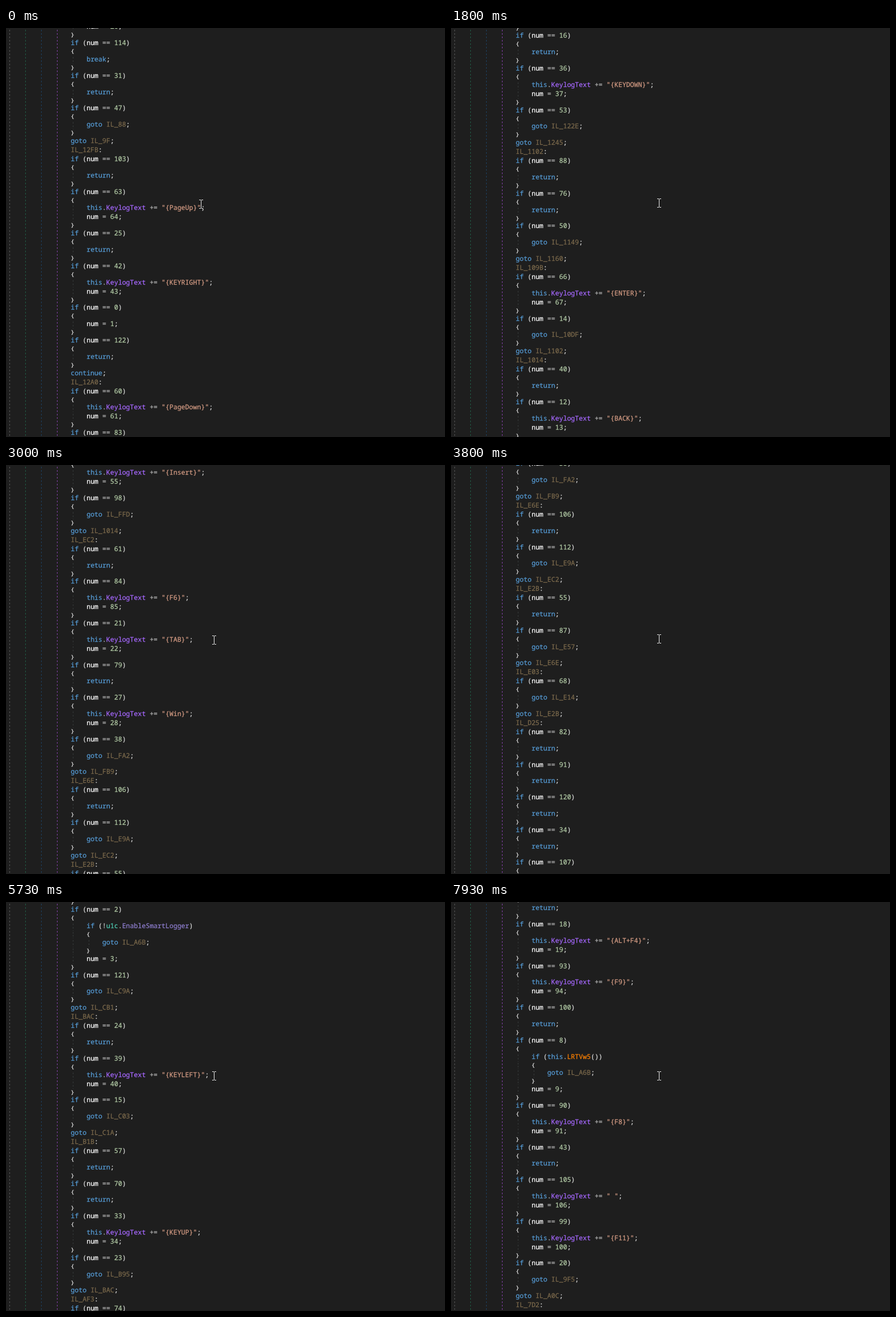
Animation of 775 by 722 pixels, one loop 8 s. Source, as an HTML page:

```html
<!DOCTYPE html>
<html lang="en">
<head>
<meta charset="utf-8">
<title>Scrolling code</title>
<style>
  html, body { margin: 0; width: 100%; height: 100%; overflow: hidden; background: #1e1e1e; }
  #stage { position: relative; width: 775px; height: 722px; overflow: hidden; background: #1e1e1e; }
  #doc {
    position: absolute; left: 114.3px; top: 0;
    font: 11.61px/16px "Noto Sans Mono", "DejaVu Sans Mono", monospace;
    text-rendering: geometricPrecision; white-space: pre; color: #dcdcdc;
    -webkit-text-stroke: .25px currentColor;
  }
  #doc div { position: absolute; left: 0; height: 16px; }
  #doc .brace { transform: scaleY(.8); transform-origin: 0 0; }
  .guide {
    position: absolute; width: 1px; height: 100%;
    background: repeating-linear-gradient(transparent 0 3px, var(--c, #363a3a) 3px 6px);
  }
  .key { color: #569cd6; }
  .str { color: #d69d85; }
  .num { color: #b5cea8; }
  .label { color: #7c6a4c; }
  .field { color: #a668ff; }
  .prop { color: #8f7fd0; }
  .type { color: #4ec9b0; }
  .method { color: #ff8000; }
  .local { color: #fff; }
  .param { color: #fff; font-weight: bold; -webkit-text-stroke: 0; }
  .op { color: #b4b4b4; }
  #cursor { position: absolute; left: 0; top: 0; }
</style>
</head>
<body>
<div id="stage">
  <i class="guide" style="left:6px;--c:#555"></i>
  <i class="guide" style="left:34px;--c:#1f5c45"></i>
  <i class="guide" style="left:62px;--c:#1d4062"></i>
  <i class="guide" style="left:90px;--c:#8440a8"></i>
  <div id="doc"></div>
  <svg id="cursor" width="7" height="16" shape-rendering="crispEdges">
    <path d="M0 0h3v1h1v-1h3v1h-3v14h3v1h-3v-1h-1v1h-3v-1h3v-14h-3z" fill="#f0f0f0"/>
  </svg>
</div>
<script>
const CHAR = 6.966, VIEW_TOP = -38.5, LOOP = 8000, FPS = 15;

// 31: return   47>88: goto   63+X: log a key   0=: next state   *: custom body
const program = `19+F12 114b 31 47>88 >9F
:12FB 103 63+PageUp 25 42+KEYRIGHT 0= 122 c
:12A0 60+PageDown 83>12E4 >12FB
:1245 72+F2 86>1289 >12A0
:1160 110* 30+CAPSLOCK 16 36+KEYDOWN 53>122E >1245
:1102 88 76 50>1149 >1160
:109B 66+ENTER 14>10DF >1102
:1014 40 12+BACK 102>1084 >109B
:FB9 54+Insert 98>FFD >1014
:EC2 61 84+F6 21+TAB 79 27+Win 38>FA2 >FB9
:E6E 106 112>E9A >EC2
:E2B 55 87>E57 >E6E
:E03 68>E14 >E2B
:D25 82 91 120 34 107>DA2 >E03
:CB1 113* 17>D02 >D25
:C1A 51+HOME 2* 121>C9A >CB1
:BAC 24 39+KEYLEFT 15>C03 >C1A
:B1B 57 70 33+KEYUP 23>B95 >BAC
:AF3 74>B04 >B1B
:A7D 6 78+F4 29>ADC >AF3
:A0C 22 109+CTRL 10>A6B >A7D
:851 13 45 18+ALT+F4 93+F9 100 8* 90+F8 43 105* 99+F11 20>9F5 >A0C
:7D2`;

const log = value => `this.KeylogText += ${value};`;
const guard = test => [`if (${test})`, '{', '    goto IL_A6B;', '}'];
const custom = {
  110: [log('Ce8iifWPN.ToString()')],
  113: [log('this.Qm0c((uint)Ce8iifWPN).ToUpper()')],
  2: guard('!u1c.EnableSmartLogger'),
  8: guard('this.LRTVw5()'),
  105: [log('" "')]
};

function expand(item) {
  const [, id, op, arg] = item.match(/^(\d*)(.?)(.*)$/);
  if (!id) return [op === ':' ? `IL_${arg}:` : op === '>' ? `goto IL_${arg};` : 'continue;'];
  const next = `num = ${+id + 1};`;
  const body = {
    '': ['return;'],
    b: ['break;'],
    '>': [`goto IL_${arg};`],
    '=': [next],
    '+': [log(`"{${arg}}"`), next],
    '*': [...(custom[id] || []), next]
  }[op];
  return [`if (num == ${id})`, '{', ...body.map(s => '    ' + s), '}'];
}

const rules = {
  str: '".*?"',
  key: '\\b(?:if|goto|return|break|continue|this|uint)\\b',
  label: 'IL_\\w+',
  field: 'KeylogText',
  prop: 'EnableSmartLogger',
  type: 'u1c',
  method: 'Qm0c|ToUpper|ToString|LRTVw5',
  param: 'Ce8iifWPN',
  local: '\\bnum\\b',
  num: '\\b\\d+\\b',
  op: '[=+!.]+'
};
const syntax = new RegExp(Object.entries(rules).map(([k, v]) => `(?<${k}>${v})`).join('|'), 'g');

function paint(text) {
  return text.replace(syntax, (...m) => {
    const groups = m[m.length - 1];
    const kind = Object.keys(groups).find(k => groups[k] !== undefined);
    return `<span class="${kind}">${m[0]}</span>`;
  });
}

const doc = document.getElementById('doc');
const cursor = document.getElementById('cursor');
const tops = [];
let y = 0;
doc.innerHTML = program.split(/\s+/).flatMap(expand).map(line => {
  const brace = /^\s*[{}]$/.test(line);
  const depth = line.search(/\S/) / 4;
  let guides = '';
  for (let d = 0; d < depth; d++) {
    guides += `<i class="guide" style="left:${(d * 4 * CHAR + 3.7).toFixed(1)}px"></i>`;
  }
  const top = y;
  tops.push(top);
  y += brace ? 12.8 : 16;
  return `<div class="${brace ? 'brace' : ''}" style="top:${top.toFixed(1)}px">${guides}${paint(line)}</div>`;
}).join('');

// Wheel bursts: starting tick, then lines scrolled on each following tick
const bursts = {
  1: '03', 5: '666', 12: '666', 18: '666', 25: '666', 30: '6663', 37: '666', 43: '666',
  49: '69', 55: '666', 60: '666', 67: '66', 73: '99', 81: '9', 85: '666', 92: '666',
  99: '66', 104: '99', 110: '666', 116: '6606'
};
const scroll = Array(LOOP / 1000 * FPS).fill(0);
for (const [start, steps] of Object.entries(bursts)) {
  [...steps].forEach((n, i) => { scroll[+start + i] = +n; });
}
let first = 1;
const firstLine = scroll.map(n => first += n);

let shown = -1;
function draw() {
  const tick = Math.floor((performance.now() % LOOP + 5) * FPS / 1000) % scroll.length;
  if (tick !== shown) {
    shown = tick;
    doc.style.top = (VIEW_TOP - tops[firstLine[tick]]).toFixed(1) + 'px';
    const [cx, cy] = tick < 1 ? [341, 303] : tick < 53 ? [364, 301] : [364, 299];
    cursor.style.left = cx + 'px';
    cursor.style.top = cy + 'px';
  }
  requestAnimationFrame(draw);
}
draw();
</script>
</body>
</html>
```
